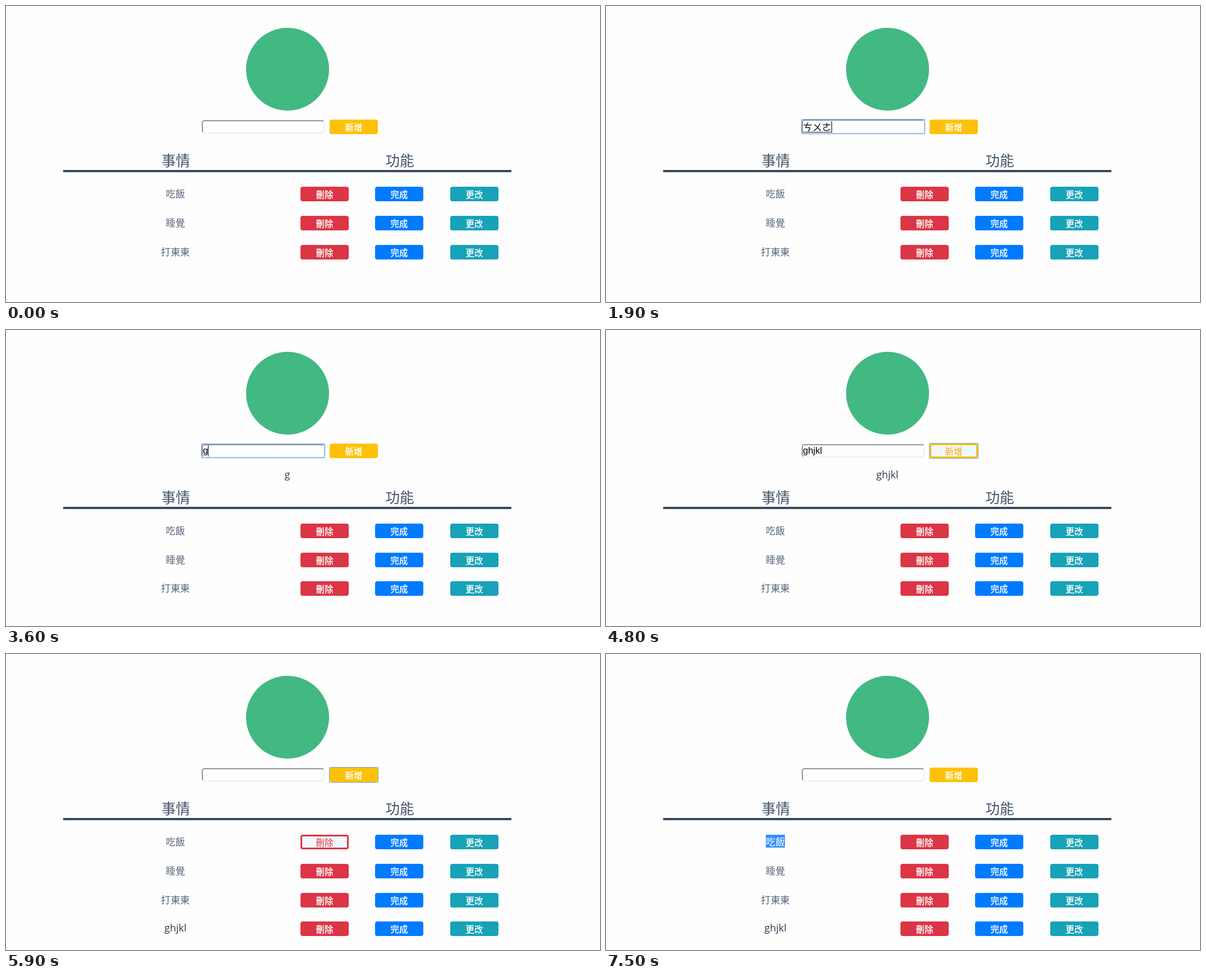
Animation of 1059 by 529 pixels, one loop 8 s. Source, as an HTML page:

```html
<!DOCTYPE html>
<html lang="zh-Hant">
<head>
<meta charset="utf-8">
<title>待辦清單</title>
<style>
  html, body { margin: 0; width: 100%; height: 100%; overflow: hidden; background: #fefefe; }
  body { position: relative; color: #2c3e50; font: 300 17.1px "Noto Sans CJK TC", "Noto Sans CJK", sans-serif; }
  div, button { position: absolute; box-sizing: border-box; }
  .latin { font: 400 18px "Open Sans", "Noto Sans", sans-serif; }

  #logo { left: 427.5px; top: 39px; width: 148px; height: 148px; border-radius: 50%; background: #42b883; }

  #field {
    left: 349px; top: 204px; width: 219px; height: 24px; border-radius: 5px; background: #fefefe;
    border: 2px solid; border-color: #949494 #eee #eee #949494;
  }
  #ring { left: 348px; top: 203px; width: 221px; height: 26px; border: 1px solid #6ea5ec; border-radius: 1px;
    box-shadow: inset 0 0 0 1px rgba(110, 165, 236, .35); visibility: hidden; }
  #field.ime { top: 203px; height: 25px; }
  #ring.ime { top: 202px; height: 27px; }
  #line { left: 351px; top: 206px; height: 20px; display: flex; color: #000; }
  #text { font: 400 16.7px/20px "Liberation Sans", Arial, sans-serif; white-space: pre; }
  #text.ime { font: 300 17px/19px "Noto Sans CJK TC", "Noto Sans CJK", sans-serif; box-shadow: inset 0 -1px #222; }
  #caret { width: 1px; height: 20px; background: #000; visibility: hidden; }

  button {
    --c: #ffc107; --h: #ffa500;
    width: 86px; height: 26px; margin: 0; padding: 0; border: 3px solid var(--c); border-radius: 4px;
    background: var(--c); color: #fff; text-align: center; -webkit-text-stroke: .4px;
    font: 500 15.4px/20px "Noto Sans CJK TC", "Noto Sans CJK", sans-serif;
  }
  button.on { background: #f0f8ff; color: var(--h); -webkit-text-stroke: 0; }
  #add { left: 577px; top: 203px; }
  #addRing { left: 576px; top: 202px; width: 88px; height: 28px; border: 1px solid #6ea5ec; border-radius: 1px;
    visibility: hidden; }
  #ring.on, #addRing.on, #caret.on { visibility: visible; }
  .del { --c: #dc3545; --h: #dc3545; left: 525px; }
  .done { --c: #007bff; --h: #007bff; left: 658px; }
  .edit { --c: #17a2b8; --h: #17a2b8; left: 792px; }

  #preview { left: 351.5px; top: 243px; width: 300px; line-height: 30px; text-align: center; }
  #list { left: 0; top: 0; width: 1059px; height: 529px; }
  .head { width: 200px; top: 255px; font-size: 25.6px; line-height: 40px; text-align: center; color: #43536a; }
  #rule { left: 102px; top: 293.4px; width: 799px; height: 4px; background: #35495e; }
  .row { left: 0; width: 1059px; height: 27px; }
  .item { left: 202px; top: 0; width: 200px; line-height: 23px; text-align: center; }
  .item span { display: inline-block; line-height: 23px; color: #56647a; }
  .item span.on { background: #3390ff; color: #fff; }
</style>
</head>
<body>
<div id="logo"></div>
<div id="field"></div>
<div id="ring"></div>
<div id="line"><span id="text"></span><span id="caret"></span></div>
<button id="add">新增</button>
<div id="addRing"></div>
<div id="preview" class="latin"></div>
<div id="list">
  <div class="head" style="left:202.5px">事情</div>
  <div class="head" style="left:602px">功能</div>
  <div id="rule"></div>
</div>
<script>
  const LOOP = 8000, BLINK = 500, ADDED = 4900;
  const $ = s => document.querySelector(s);
  const list = $("#list"), text = $("#text"), caret = $("#caret"), preview = $("#preview");

  const rows = ["吃飯", "睡覺", "打東東", "ghjkl"].map((name, i) => {
    const row = document.createElement("div");
    row.className = "row";
    row.style.top = 323.4 + i * 51.6 + "px";
    const latin = /[a-z]/.test(name);
    const label = latin ? name : [...name].map(c => `<span>${c}</span>`).join("");
    row.innerHTML = `<div class="item${latin ? " latin" : ""}" style="line-height:23px">${label}</div>
      <button class="del">刪除</button><button class="done">完成</button><button class="edit">更改</button>`;
    list.append(row);
    return row;
  });

  // Field content from each moment on
  const typing = [
    [0, ""], [1000, ""], [1700, "ㄘ"], [1800, "ㄘㄨ"], [1900, "ㄘㄨㄜ"],
    [2400, "ㄘㄨ"], [2600, "ㄘ"], [2700, ""],
    [3600, "g"], [3700, "ghj"], [3800, "ghjkl"], [ADDED, ""]
  ];

  // Spans of time in which a part is highlighted
  const chars = rows[0].querySelectorAll(".item span");
  const spans = [
    [$("#ring"), 1000, 4700],
    [$("#add"), 4600, 5300],
    [$("#addRing"), 4700, 7300],
    [rows[0].querySelector(".del"), 5900, 6500],
    [rows[0].querySelector(".done"), 6500, 6800],
    [chars[1], 7400, LOOP],
    [chars[0], 7500, LOOP]
  ];

  function setText(el, value) {
    if (el.textContent !== value) el.textContent = value;
  }

  function draw() {
    const t = performance.now() % LOOP;
    const [since, value] = typing.filter(s => s[0] <= t).pop();
    const ime = /[ㄅ-ㄩ]/.test(value);
    const shown = ime ? "" : value;

    for (const [el, from, to] of spans) el.classList.toggle("on", t >= from && t < to);
    for (const el of [text, $("#field"), $("#ring")]) el.classList.toggle("ime", ime);

    setText(text, value);
    setText(preview, shown);
    list.style.top = shown ? "22.8px" : "0";
    rows[3].style.visibility = t >= ADDED ? "visible" : "hidden";

    const focused = t >= 1000 && t < 4700;
    caret.classList.toggle("on", focused && Math.floor((t - since) / BLINK) % 2 === 0);
    requestAnimationFrame(draw);
  }
  draw();
</script>
</body>
</html>
```
